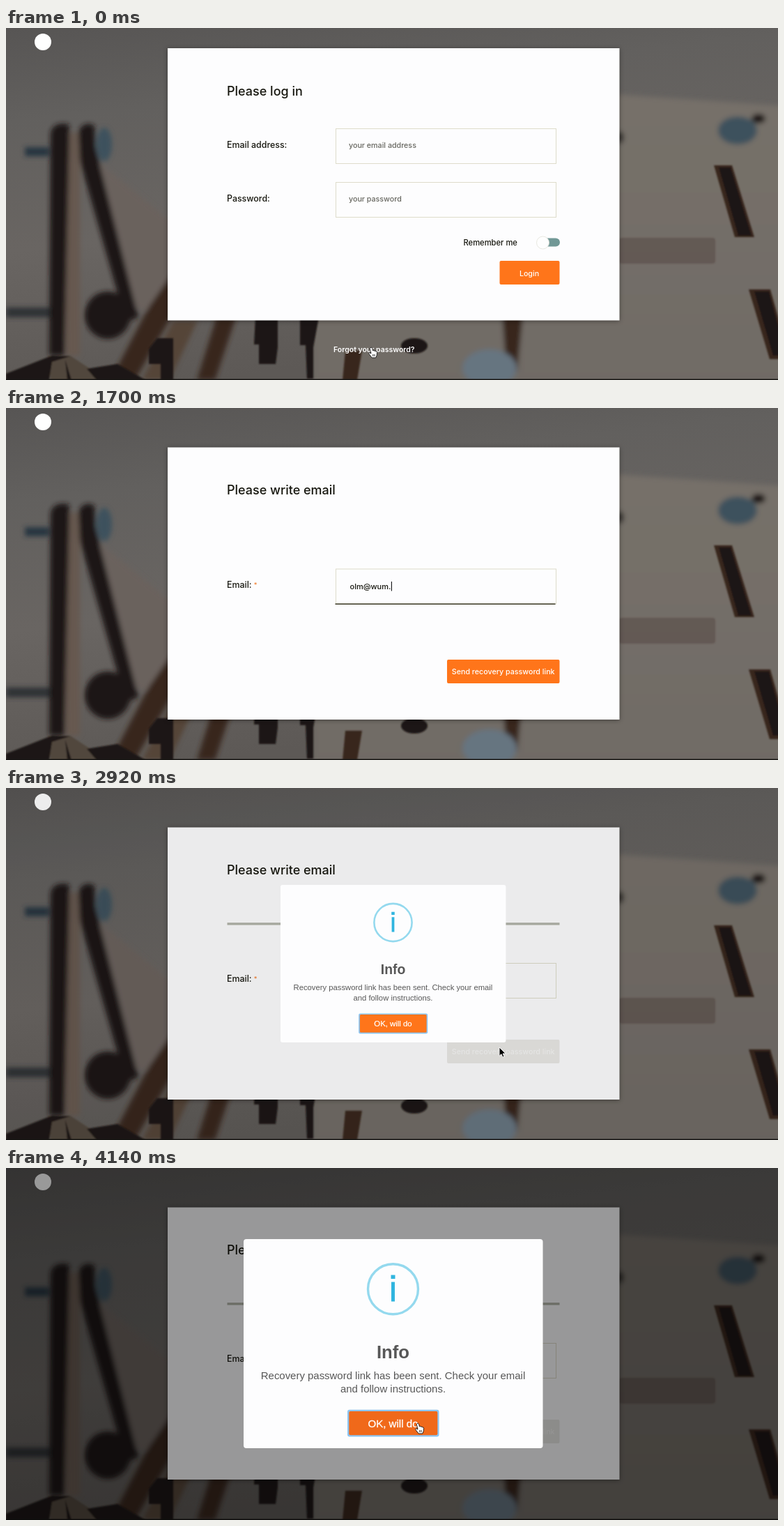
Recreate the animation shown at these times as an HTML page. Size 1108x505 px, loop 4160 ms.

```html
<!DOCTYPE html>
<html lang="en">
<head>
<meta charset="utf-8">
<title>Password recovery</title>
<style>
html, body { margin: 0; width: 100%; height: 100%; overflow: hidden; background: #666360; }
svg { display: block; width: 100vw; height: 100vh; }
text { font-family: Inter, sans-serif; font-weight: 500; fill: #17170f; white-space: pre; }
.title { font-size: 18px; }
.label { font-size: 12.4px; }
.hint { font-size: 10.7px; fill: #66665f; }
.button { font-size: 10.7px; fill: #fff; text-anchor: middle; }
.field { fill: #fdfdfe; stroke: #dedccb; }
.card { fill: #fdfdfe; filter: drop-shadow(0 1px 3px rgba(0, 0, 0, .4)); }
.dark { fill: #1d1513; }
.wood { fill: #39261e; }
.blue { fill: #3d515d; }
#modal { transform-origin: 555.5px 252px; }
#modal text { font-family: "Liberation Sans", Arial, sans-serif; font-weight: 400; text-anchor: middle; fill: #575757; }
</style>
</head>
<body>
<svg viewBox="0 0 1108 505" preserveAspectRatio="none">
  <defs>
    <linearGradient id="wall" x2=".25" y2="1">
      <stop offset="0" stop-color="#575554"/>
      <stop offset=".25" stop-color="#62605e"/>
      <stop offset=".6" stop-color="#696562"/>
      <stop offset="1" stop-color="#5d5956"/>
    </linearGradient>
    <linearGradient id="board" x2="0" y2="1">
      <stop offset="0" stop-color="#767069"/>
      <stop offset="1" stop-color="#706b65"/>
    </linearGradient>
    <filter id="soft" x="-10%" y="-10%" width="120%" height="120%"><feGaussianBlur stdDeviation="3.5"/></filter>
    <filter id="crisp" x="-10%" y="-10%" width="120%" height="120%"><feGaussianBlur stdDeviation="1.3"/></filter>
  </defs>

  <!-- blurred workshop backdrop -->
  <rect width="1108" height="505" fill="url(#wall)"/>
  <g filter="url(#soft)">
    <path d="M840 93L1120 112V520H440V410H840Z" fill="url(#board)"/>
    <path d="M130 190L240 280V420L185 400Z" fill="#6b625d"/>
    <path d="M82 150H106V470H86Z" fill="#66594f"/>
    <path d="M0 401H64V415H0Z" fill="#2d3236"/>
    <ellipse class="blue" cx="141" cy="167" rx="11" ry="24"/>
    <path d="M27 171H62V184H27Z" fill="#26343f"/>
    <path class="dark" d="M64 150Q68 134 90 138L91 152L84 470H62Z"/>
    <path class="dark" d="M104 150Q110 132 127 140L128 170L190 415L172 422L106 190Z"/>
    <ellipse class="dark" cx="146" cy="412" rx="33" ry="34"/>
    <path class="wood" d="M150 505L205 400L240 350V410L185 505Z"/>
    <path d="M195 505L240 420H275L235 505Z" fill="#544439"/>
    <path class="wood" d="M274 505L302 415H330L300 505Z"/>
    <path class="wood" d="M712 410H742L734 492H718Z"/>
    <ellipse cx="694" cy="488" rx="39" ry="27" fill="#667480"/>
    <ellipse class="blue" cx="1050" cy="147" rx="28" ry="20"/>
    <ellipse class="dark" cx="1080" cy="130" rx="10" ry="7"/>
    <ellipse cx="880" cy="157" rx="7" ry="9" fill="#36302d"/>
  </g>
  <g filter="url(#crisp)">
    <path d="M60 470H92L145 505H64Z" fill="#51473d"/>
    <path class="dark" d="M0 496L66 470L92 471L66 479L62 505H0Z M85 476L94 505H88Z M116 489L160 482L200 505H130Z"/>
    <path class="dark" d="M205 460L217 445H240V505H222V482H205Z"/>
    <path class="dark" d="M358 415H390V458L387 482H363V454H356Z M422 415H449L441 458V503H432L430 455H422Z"/>
    <path class="wood" d="M487 463H511L504 505H483Z"/>
    <ellipse class="dark" cx="586" cy="456" rx="19" ry="11"/>
    <path class="wood" d="M1016 197H1042L1074 300H1046Z M1066 375H1097L1125 475H1096Z"/>
    <path class="dark" d="M1023 200H1040L1070 298H1051Z M1074 378H1095L1120 470H1101Z"/>
    <rect x="880" y="301" width="138" height="37" rx="4" fill="#51443a" opacity=".45"/>
  </g>
  <rect y="503.5" width="1108" height="1.5" fill="#161412"/>
  <circle cx="53" cy="20" r="12" fill="#fff"/>

  <g id="login">
    <rect class="card" x="232" y="29" width="648.5" height="390.5"/>
    <text class="title" x="317" y="97">Please log in</text>
    <text class="label" x="317" y="171.5">Email address:</text>
    <rect class="field" x="473.5" y="144.5" width="316" height="50"/>
    <text class="hint" x="492" y="171.5">your email address</text>
    <text class="label" x="317" y="248.5">Password:</text>
    <rect class="field" x="473.5" y="221.5" width="316" height="50"/>
    <text class="hint" x="492" y="248.5">your password</text>
    <text x="656.5" y="312" font-size="11.2">Remember me</text>
    <rect x="763" y="301.5" width="32" height="12" rx="6" fill="#719896"/>
    <circle cx="770.5" cy="308" r="9" fill="#fefefe" stroke="#e3e2da" stroke-width=".8"/>
    <rect x="708.5" y="334" width="86" height="34" rx="2" fill="#ff751a"/>
    <text class="button" x="751" y="355.5">Login</text>
    <text x="470" y="464.5" font-size="10.5" style="font-weight:600;fill:#fff">Forgot your password?</text>
  </g>

  <g id="recovery">
    <rect class="card" x="232" y="56.5" width="648.5" height="390.5"/>
    <text class="title" x="317" y="124">Please write email</text>
    <g id="progress">
      <rect x="317.5" y="193.2" width="477" height="3.4" fill="#b3b5aa"/>
      <rect id="bar" y="193.2" height="3.4" fill="#f0731f"/>
    </g>
    <g id="row">
      <text class="label" x="317" y="257.5">Email: <tspan font-size="9" dy="-1" fill="#f07a2a">*</tspan></text>
      <rect class="field" x="473.5" y="231" width="316" height="50"/>
      <text id="hint" class="hint" x="492" y="257">email where you want recive recovery password link</text>
      <text id="typed" x="493.5" y="259.5" font-size="11"></text>
      <path id="squiggle" d="M494 261.5H569" stroke="#e0402f" stroke-width="1.5" stroke-dasharray="1.7 1.3"/>
      <rect id="caret" y="249" width="1.1" height="13.5" fill="#111"/>
      <path id="focus" d="M472.5 281.2H788.5" stroke="#3b3a26" stroke-width="1.4"/>
    </g>
    <rect id="send" x="633" y="361" width="161.5" height="34" rx="2"/>
    <text id="sendText" class="button" x="713.7" y="382">Send recovery password link</text>
  </g>

  <rect id="shade" width="1108" height="505"/>
  <g id="modal">
    <rect x="341" y="102" width="429.5" height="300" rx="4" fill="#fdfdfe"/>
    <circle cx="555.5" cy="173.7" r="36" fill="none" stroke="#94d9ee" stroke-width="3.4"/>
    <path d="M553 163.5H558V191.5H553Z M552.5 153.5H558.5V159H552.5Z" fill="#30b5df"/>
    <text x="555.5" y="272.5" font-size="25.7" style="font-weight:700">Info</text>
    <text x="555.5" y="303" font-size="14.95">Recovery password link has been sent. Check your email</text>
    <text x="555.5" y="321.8" font-size="14.95">and follow instructions.</text>
    <rect x="490" y="346.8" width="131.5" height="38.6" rx="3" fill="#8cc5f2"/>
    <rect id="ok" x="492.3" y="349" width="127" height="34.2" rx="2"/>
    <text x="555.5" y="371.5" font-size="15.1" style="fill:#fff;stroke:#fff;stroke-width:.3">OK, will do</text>
  </g>

  <g id="cursor">
    <path id="arrow" d="M0 0V12.5L2.9 9.8L4.9 14.2L7 13.3L5.1 9H9Z" fill="#000" stroke="#fff" stroke-width=".9"/>
    <path id="hand" d="M2 .8Q3.6 -.6 4.4 1.2L5.6 5Q7 4 7.8 5.3Q9.2 4.6 9.8 6Q11.4 5.6 11.6 7.4L11.2 11.5L9.8 15H4.2L.4 10.2Q-1.2 8 .5 7.7L3 9L1.4 2.2Q1.3 1.3 2 .8ZM5.8 10V13M8 10V13" fill="#fff" stroke="#111" stroke-width=".9"/>
    <path id="beam" d="M-2.6 -7Q0 -7 0 -5.2Q0 -7 2.6 -7M0 -5.2V5.2M-2.6 7Q0 7 0 5.2Q0 7 2.6 7M-1.5 2.6H1.5" fill="none" stroke="#111" stroke-width="1.2"/>
  </g>
</svg>

<script>
const LOOP = 4160;
const EMAIL = "olm@wum.example";
const at = { recovery: 300, focus: 880, typing: 1150, keyStep: 75, squiggle: 2225, move: 2290, send: 2549, modal: 2903 };
const SWEEP = 640, BAR = 190, TRACK_LEFT = 317.5, TRACK_RIGHT = 794.5;

// time, x, y of the pointer's hot spot
const path = [
  [0, 521, 458], [420, 521, 458], [800, 544, 262], [at.move, 544, 262],
  [2500, 708, 372], [3020, 708, 372], [3240, 679, 370], [3700, 588, 366], [LOOP, 588, 366]
];

const $ = {};
document.querySelectorAll("[id]").forEach(el => $[el.id] = el);
const show = (el, on) => { el.style.display = on ? "" : "none"; };
const set = (el, attrs) => { for (const key in attrs) el.setAttribute(key, attrs[key]); };
const clamp = v => Math.min(1, Math.max(0, v));

const pop = $.modal.animate([
  { transform: "scale(.7)", offset: 0, easing: "ease" },
  { transform: "scale(1.05)", offset: .45, easing: "ease" },
  { transform: "scale(.95)", offset: .8, easing: "ease" },
  { transform: "scale(1)", offset: 1 }
], { duration: 300, fill: "both" });
pop.pause();

function pointer(t) {
  const i = Math.max(1, path.findIndex(p => p[0] > t));
  const [t0, x0, y0] = path[i - 1], [t1, x1, y1] = path[i];
  const u = clamp((t - t0) / (t1 - t0)), e = u * u * (3 - 2 * u);
  return [x0 + (x1 - x0) * e, y0 + (y1 - y0) * e];
}

function drawForm(t) {
  const sent = t >= at.send;
  const focused = t >= at.focus && !sent;
  const count = Math.max(0, Math.min(EMAIL.length, Math.floor((t - at.typing) / at.keyStep) + 1));
  show($.login, t < at.recovery);
  show($.recovery, t >= at.recovery);
  $.typed.textContent = EMAIL.slice(0, count);
  show($.hint, count === 0);
  show($.caret, focused && count > 0);
  show($.focus, focused);
  show($.squiggle, t >= at.squiggle && !sent);
  if (count) set($.caret, { x: 494 + $.typed.getComputedTextLength() });
  set($.row, { transform: `translate(0 ${sent ? 20.5 : 0})` });
  set($.send, { fill: sent ? "#e9e8e5" : "#ff751a" });
  $.sendText.style.fill = sent ? "#f6f6f5" : "#fff";

  show($.progress, sent);
  const left = TRACK_LEFT - BAR + (TRACK_RIGHT - TRACK_LEFT + BAR) * (((t - at.send) / SWEEP) % 1);
  const from = Math.max(TRACK_LEFT, left), to = Math.min(TRACK_RIGHT, left + BAR);
  if (sent) set($.bar, { x: from, width: Math.max(0, to - from) });
}

function drawModal(t) {
  const age = t - at.modal;
  show($.modal, age >= 0);
  pop.currentTime = Math.min(300, Math.max(0, age));
  set($.shade, { opacity: .4 * clamp(age / 100) });
}

function drawCursor(t) {
  const [x, y] = pointer(t);
  const overInput = t >= at.recovery && t < at.send && x > 473 && x < 790 && y > 231 && y < 281;
  const overSend = t < at.send && t > at.move && x > 633 && y > 361;
  const overOk = t > at.modal && x < 619;
  const hand = t < at.recovery || overSend || overOk;
  show($.cursor, t < at.typing || t >= at.move);
  show($.beam, overInput);
  show($.hand, hand);
  show($.arrow, !overInput && !hand);
  set($.cursor, { transform: `translate(${x} ${y})` });
  set($.ok, { fill: overOk ? "#f0691a" : "#ff751a" });
}

const start = performance.now();
function frame() {
  const t = (performance.now() - start) % LOOP;
  drawForm(t);
  drawModal(t);
  drawCursor(t);
  requestAnimationFrame(frame);
}
frame();
</script>
</body>
</html>
```
